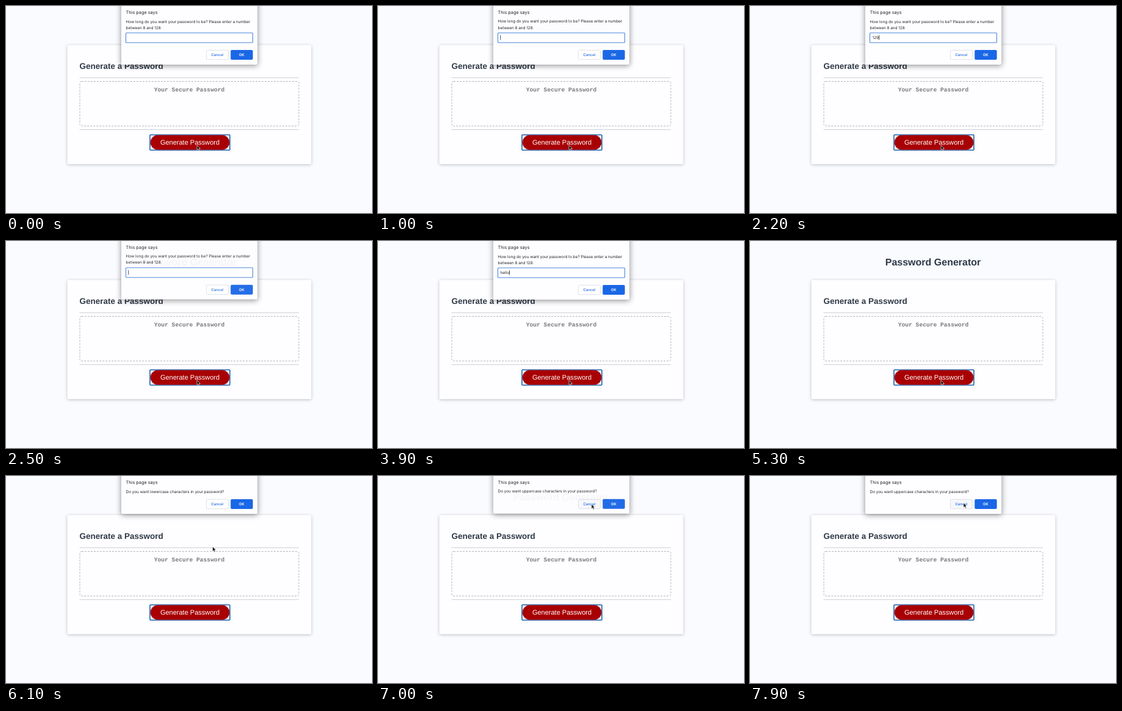
Recreate the animation shown at these times as an HTML page. Size 600 by 339 pixels, loop 8 s.

```html
<!DOCTYPE html>
<html lang="en">
<head>
<meta charset="utf-8">
<title>Password Generator</title>
<style>
  html, body { margin: 0; width: 100%; height: 100%; overflow: hidden; background: #f9fbff; }
  svg { display: block; width: 100%; height: 100%; }
  text { font-family: "Liberation Sans", Arial, sans-serif; text-rendering: geometricPrecision; white-space: pre; }
  .card { fill: #fefdff; filter: drop-shadow(0 1px 2.5px rgba(0, 0, 0, .24)); }
  .heading { font-weight: bold; fill: #2f3a47; }
  .rule { stroke: #cfd1d6; }
  .placeholder { font: bold 9.63px "Liberation Mono", monospace; fill: #7a7a7c; }
  #dialog text { font: 6.38px Inter, sans-serif; fill: #202124; }
  #dialog .title { font-size: 7.3px; }
  #dialog .label { font-size: 6px; font-weight: 500; text-anchor: middle; fill: #1b67e0; }
  #dialog .primary { font-weight: 600; fill: #fff; }
  #panel { fill: #fefdff; filter: drop-shadow(0 0 .6px rgba(0, 0, 0, .45)) drop-shadow(0 2px 5px rgba(0, 0, 0, .42)); }
</style>
</head>
<body>
<svg viewBox="0 0 600 339">
  <rect width="600" height="339" fill="#f9fbff"/>
  <text class="heading" x="300" y="40" font-size="16" text-anchor="middle">Password Generator</text>

  <rect class="card" x="100.5" y="64" width="400" height="195" rx="2.5"/>
  <text class="heading" x="120.5" y="102.5" font-size="13.5">Generate a Password</text>
  <path class="rule" d="M120.5 117.5H480M120.5 202.5H480"/>
  <rect x="121" y="123.5" width="359" height="73" rx="3" fill="none" stroke="#b4b4b9" stroke-dasharray="3 2"/>
  <text class="placeholder" x="300.5" y="140" text-anchor="middle">Your Secure Password</text>

  <rect x="236" y="211" width="131" height="25" rx="1" fill="#fff" stroke="#1c5fa8" stroke-width="1.6"/>
  <rect x="236.8" y="211.6" width="129.6" height="23.8" rx="11.9" fill="#a80003"/>
  <text x="301.5" y="227.2" font-size="11" text-anchor="middle" fill="#fff">Generate Password</text>

  <g id="dialog">
    <path id="panel"/>
    <text class="title" x="196.6" y="13.2">This page says</text>
    <text id="line1" x="196.6" y="27.5"></text>
    <text id="line2" x="196.6" y="37.6">between 8 and 128.</text>
    <g id="field">
      <rect x="196.5" y="44" width="208" height="16" rx="1" fill="#fff" stroke="#4a86dc" stroke-width="1.1"/>
      <text id="entry" x="200.6" y="54.1"></text>
      <rect id="caret" y="48" width=".8" height="7.6" fill="#202124"/>
    </g>
    <g id="buttons">
      <rect id="cancel" x="328.5" y="38.3" width="36" height="15.4" rx="2" stroke="#d9dbe0" stroke-width=".8"/>
      <text class="label" x="346.4" y="48.1">Cancel</text>
      <rect x="368.3" y="38" width="36.4" height="16" rx="2" fill="#1a67e6"/>
      <text class="label primary" x="386.4" y="48.1">OK</text>
    </g>
  </g>

  <path id="pointer" d="M0 0V7.6L1.8 6 3.1 8.9 4.4 8.3 3.2 5.5H5.5Z" fill="#111" stroke="#fff" stroke-width=".6"/>
</svg>
<script>
const LOOP = 8000, FADE = 150, BLINK = 500;
const lengthQuestion = "How long do you want your password to be? Please enter a number";
const caseQuestion = kind => `Do you want ${kind} characters in your password?`;

// Each prompt: when it opens and closes, what is typed, when typing starts, ms per key.
const prompts = [
  { open: -900, close: 850, typed: "7", start: 200, pace: 100 },
  { open: 880, close: 2340, typed: "129", start: 1800, pace: 150 },
  { open: 2405, close: 3280, typed: "0", start: 3000, pace: 100 },
  { open: 3340, close: 4030, typed: "hello", start: 3500, pace: 90 },
  { open: 4095, close: 5290, typed: "8", start: 5000, pace: 100 },
];
const confirms = [
  { open: 5400, close: 6760, message: caseQuestion("lowercase") },
  { open: 6900, close: LOOP, message: caseQuestion("uppercase") },
];
const dialogs = [...prompts, ...confirms];

// Pointer stops: time, x, y.
const pointerPath = [
  [0, 313, 228], [5850, 313, 228], [6100, 338.7, 116],
  [6450, 350, 46], [7650, 350, 46], [7850, 350, 44], [LOOP, 350, 44],
];

const el = id => document.getElementById(id);
const set = (id, name, value) => el(id).setAttribute(name, value);
const show = (id, visible) => set(id, "visibility", visible ? "inherit" : "hidden");
const clamp = v => Math.min(1, Math.max(0, v));

function pointerAt(t) {
  const i = pointerPath.findIndex(stop => stop[0] > t);
  const [t0, x0, y0] = pointerPath[i - 1], [t1, x1, y1] = pointerPath[i];
  const p = (t - t0) / (t1 - t0);
  return [x0 + (x1 - x0) * p, y0 + (y1 - y0) * p];
}

function drawField(dialog, t) {
  const count = Math.floor((t - dialog.start) / dialog.pace) + 1;
  const keys = Math.min(dialog.typed.length, Math.max(0, count));
  el("entry").textContent = dialog.typed.slice(0, keys);
  // Every key restarts the caret blink.
  const blinkFrom = keys ? dialog.start + (keys - 1) * dialog.pace : dialog.open + 100;
  show("caret", Math.floor(Math.max(0, t - blinkFrom) / BLINK) % 2 === 0);
  set("caret", "x", 200.4 + (keys ? el("entry").getComputedTextLength() + .4 : 0));
}

function drawDialog(t, x, y) {
  const dialog = dialogs.find(d => t >= d.open && t < d.close);
  show("dialog", dialog);
  if (!dialog) return;
  const isPrompt = "typed" in dialog;
  const shift = isPrompt ? 34 : 0;
  const opacity = 1 - (1 - clamp((t - dialog.open) / FADE)) ** 3;
  set("dialog", "opacity", opacity);
  set("dialog", "transform", `translate(0 ${-6 * (1 - opacity)})`);
  set("panel", "d", `M188.7 -12H412.5V${60 + shift}q0 2 -2 2H190.7q-2 0 -2 -2Z`);
  set("buttons", "transform", `translate(0 ${shift})`);
  el("line1").textContent = isPrompt ? lengthQuestion : dialog.message;
  show("line2", isPrompt);
  show("field", isPrompt);
  show("caret", false);
  if (isPrompt) drawField(dialog, t);
  const hovered = x > 328 && x < 365 && y > 38 + shift && y < 54 + shift;
  set("cancel", "fill", hovered ? "#f5f7fb" : "#fff");
}

function draw(t) {
  const [x, y] = pointerAt(t);
  drawDialog(t, x, y);
  set("pointer", "transform", `translate(${x} ${y})`);
}

function tick() {
  draw(performance.now() % LOOP);
  requestAnimationFrame(tick);
}
tick();
</script>
</body>
</html>
```
